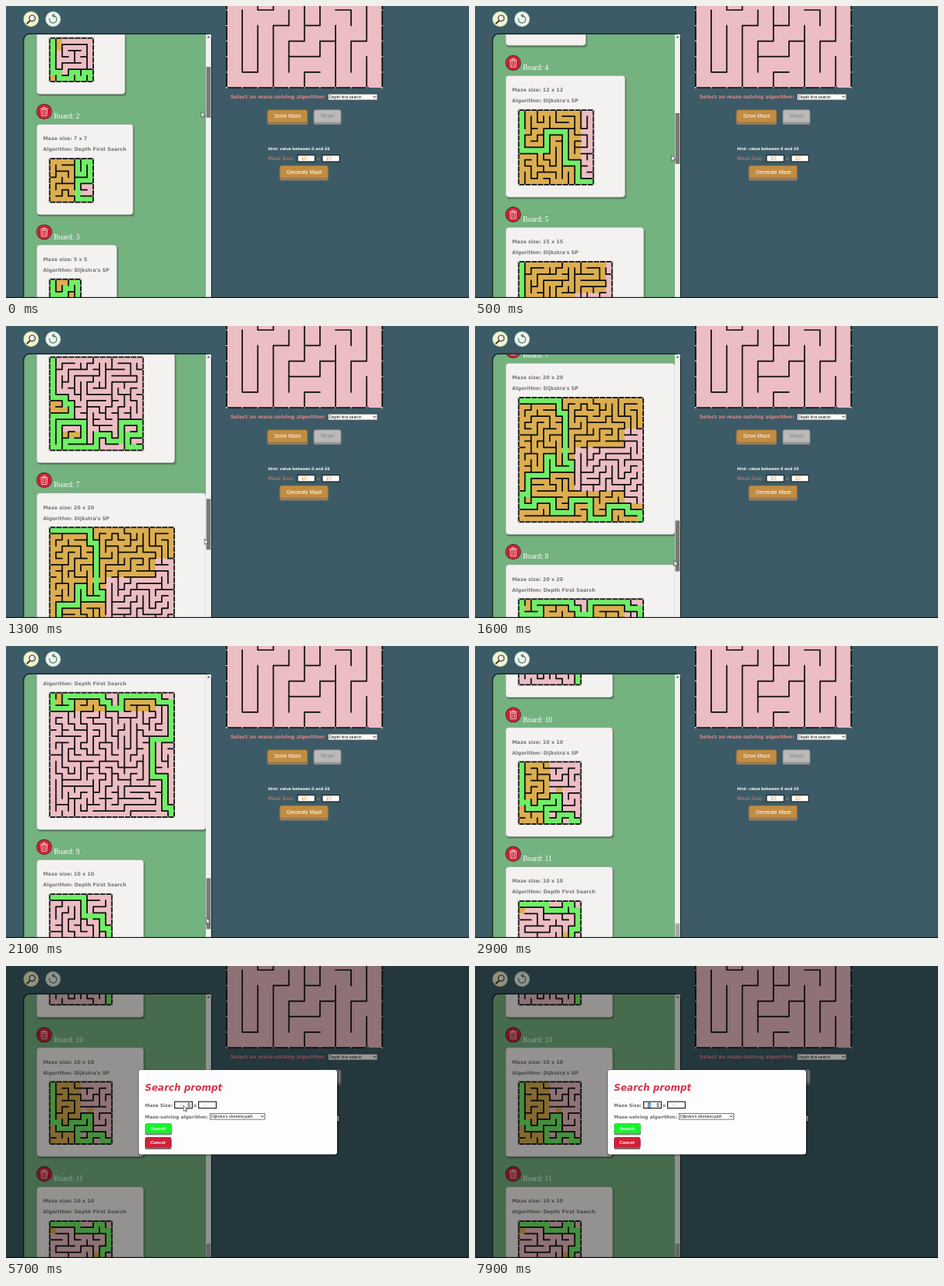
Animation, 600 px wide and 379 px high, one loop 8000 ms. Source, as an HTML page:

```html
<!DOCTYPE html>
<html lang="en">
<head>
<meta charset="utf-8">
<title>Maze boards</title>
<style>
  html, body { margin: 0; width: 100%; height: 100%; overflow: hidden; background: #3c5b66; }
  svg { display: block; }
  text { white-space: pre; }
  .sans { font-family: "DejaVu Sans", Verdana, sans-serif; font-size: 6.4px; }
  .ui { font-family: "Liberation Sans", Arial, sans-serif; font-size: 5.33px; }
  .serif { font-family: "Liberation Serif", Times, serif; font-size: 9.6px; }
  .bold { font-weight: bold; }
  .btn { font-size: 6.67px; }
  .small { font-size: 6px; }
  .hint { font-size: 4.8px; }
  .title { font-size: 12px; font-weight: bold; font-style: italic; }
</style>
</head>
<body>
<svg id="stage" width="600" height="379" viewBox="0 0 600 379"></svg>
<script>
const CELL = 8.07, BIG = 20.15, LOOP = 8000;
const GREEN = '#70ee66', ORANGE = '#dcae50', PINK = '#ecbdc3';
const STEP = { U: [0, -1], R: [1, 0], D: [0, 1], L: [-1, 0] };

// size, algorithm with its text width, seed, solution route,
// explored areas and holes in them (x0 y0 x1 y1 in base 36)
const DFS = ['Depth First Search', 125], SP = ["Dijkstra's SP", 104], BFS = ['Breadth First', 114.5];
const route15 = 'D6R2D1R1D2L3D5R1U4R4D3L3D1R5U2R2D1R2U3R3D2L2D2R2';
const boards = [
  [7, BFS, 3, 'D5R1D1R2U1R1D1R1U1R1D1', '1011 0606'],
  [7, DFS, 8, '4D2R1U2R1D3L2D3R2', '0036'],
  [5, SP, 5, 'D2R2U1R1U1R1D4', '0044'],
  [12, SP, 14, 'D6R4U3R3D5R2D3R2', '009b'],
  [15, SP, 21, route15, '10d4 1586 0728 2c4c'],
  [15, DFS, 21, route15, '0728 2c4c'],
  [20, SP, 33, 'R6D2R1D8R1D1L3U2L1D3L3D3L1D2R2U1R3D2R3U2R3D3R3U2R3D1R2D1', '00jj', '98ge h5jg'],
  [20, DFS, 47, 'D2R3U1L1U1R6D1R1D1R2U2R6D1R2D6L3D6R2D5R1D1', '0011 4182 c1g2'],
  [10, DFS, 52, 'R5D3R3D2R1D4', ''],
  [10, SP, 64, 'D6R1D1R2U1R2U1R1D2L2D2R2U1R2D1R1', '1045 0739 6464 2636'],
  [10, DFS, 71, 'R4D1R3U1R1D1R1D3L1D5R1', '0101 7575']
];

const random = seed => () => (seed = (seed * 16807) % 2147483647) / 2147483647;
const rect = (x, y, w, h, fill, extra = '') =>
  `<rect x="${x}" y="${y}" width="${w}" height="${h}" fill="${fill}" ${extra}/>`;
const path = (d, extra) => `<path d="${d}" ${extra}/>`;
const text = (x, y, s, cls, fill) =>
  `<text x="${x}" y="${y}" class="${cls}" fill="${fill}">${s}</text>`;
const at = (x, y, inner) => `<g transform="translate(${x} ${y})">${inner}</g>`;

function ticks(n, c, r) {
  let d = '';
  for (let i = 0; i <= n; i++) {
    const p = i * c, e = n * c;
    d += `M${p} ${-r}v${2 * r}M${p} ${e - r}v${2 * r}M${-r} ${p}h${2 * r}M${e - r} ${p}h${2 * r}`;
  }
  return path(d, 'stroke="#f6eeee" stroke-width="1"');
}

// Carves a maze around the route and returns the open links and the route's cells.
function carve(n, seed, route) {
  const rnd = random(seed * 7919), links = new Set(), seen = new Set(), stack = [];
  const key = (x, y) => y * n + x;
  const link = (a, b) => links.add(Math.min(a, b) + ':' + Math.max(a, b));
  const visit = (x, y) => { seen.add(key(x, y)); stack.push([x, y]); };
  let x = parseInt(route) || 0, y = 0;
  visit(x, y);
  for (const [, dir, count] of route.matchAll(/([URDL])(\d+)/g))
    for (let i = 0; i < +count; i++) {
      const from = key(x, y);
      x += STEP[dir][0];
      y += STEP[dir][1];
      link(from, key(x, y));
      visit(x, y);
    }
  const solved = new Set(seen);
  stack.sort(() => rnd() - 0.5);
  while (stack.length) {
    const [cx, cy] = stack[stack.length - 1];
    const next = Object.values(STEP).map(([dx, dy]) => [cx + dx, cy + dy])
      .filter(([a, b]) => a >= 0 && b >= 0 && a < n && b < n && !seen.has(key(a, b)));
    if (!next.length) { stack.pop(); continue; }
    const cell = next[Math.floor(rnd() * next.length)];
    link(key(cx, cy), key(...cell));
    visit(...cell);
  }
  return { links, solved };
}

const areaList = s => s.split(' ').filter(Boolean).map(a => [...a].map(c => parseInt(c, 36)));
const hit = (list, x, y) => list.some(([l, t, r, b]) => x >= l && x <= r && y >= t && y <= b);

function maze(n, seed, route, areas, holes = '') {
  const { links, solved } = carve(n, seed, route);
  const boxes = areaList(areas), gaps = areaList(holes), size = n * CELL;
  const fills = { [GREEN]: '', [ORANGE]: '' };
  let walls = '';
  for (let j = 0; j < n; j++)
    for (let i = 0; i < n; i++) {
      const k = j * n + i, x = i * CELL, y = j * CELL;
      const color = solved.has(k) ? GREEN : hit(boxes, i, j) && !hit(gaps, i, j) ? ORANGE : '';
      if (color) fills[color] += `M${x} ${y}h8.1v8.1h-8.1z`;
      if (i < n - 1 && !links.has(k + ':' + (k + 1))) walls += `M${x + CELL} ${y}v${CELL}`;
      if (j < n - 1 && !links.has(k + ':' + (k + n))) walls += `M${x} ${y + CELL}h${CELL}`;
    }
  return rect(0, 0, size, size, PINK) +
    Object.entries(fills).map(([c, d]) => path(d, `fill="${c}"`)).join('') +
    path(walls + `M0 0H${size}V${size}H0z`,
      'fill="none" stroke="#0b0b0b" stroke-width="1.75" stroke-linecap="round"') +
    ticks(n, CELL, 0.9);
}

const bin = `<circle r="10.1" fill="#4a2024"/><circle r="9.2" fill="#c9182e"/>
  <circle r="8.2" fill="none" stroke="#e0485a" stroke-width=".7"/>` +
  path('M-5 -3.8H5M-1.6 -4V-5.4H1.6V-4M-4 -2.1L-3.3 5.4H3.3L4 -2.1zM-1.4 -.8V4M1.4 -.8V4',
    'fill="none" stroke="#f6e4e4" stroke-width=".9"');

function list() {
  let top = -3;
  return boards.map(([n, [name, min], ...plan], i) => {
    const w = Math.max(min, n * CELL + 58), h = n * CELL + 61;
    const html = at(49.5, top - 16.5, bin) +
      text(62, top - 7.2, 'Board: ' + (i + 1), 'serif', '#fff') +
      rect(40.8, top + 1.6, w + 1, h + 1, '#000', 'rx="4" opacity=".18"') +
      rect(40.3, top + 1, w, h, '#000', 'rx="4" opacity=".35"') +
      rect(39.8, top, w, h, '#f4f2f0', 'rx="4" stroke="#8a958c" stroke-width=".6"') +
      text(48, top + 21, `Maze size: ${n} x ${n}`, 'sans bold', '#777') +
      text(48, top + 35, 'Algorithm: ' + name, 'sans bold', '#777') +
      at(56.6, top + 44.7, maze(n, ...plan));
    top += h + 39;
    return html;
  }).join('');
}

const button = (x, y, w, h, label, tx, ty, fill, edge, base, ink, cls = 'ui btn') =>
  rect(x, y + 3, w, h - 2.4, base, 'rx="2"') +
  rect(x + .5, y + .5, w - 1, h - 3, fill, `rx="2" stroke="${edge}"`) +
  text(tx, ty, label, cls, ink);
const gold = (x, y, w, label, tx) =>
  button(x, y, w, 19, label, tx, y + 10.8, '#c18d43', '#a8742c', '#8b7f70', '#fff');

const select = (x, y, w, h, label) =>
  rect(x + .4, y + .4, w - .8, h - .8, '#fff', 'stroke="#555" stroke-width=".8"') +
  text(x + 2, y + 6, label, 'ui', '#111') +
  path(`M${x + w - 5.5} ${y + 3.2}l1.7 1.9l1.7 -1.9`, 'fill="none" stroke="#111" stroke-width=".9"');

const field = (x, y, w, value, ink, tx) =>
  rect(x + .6, y + .6, w - 1.2, 8.4, '#fff', 'stroke="#15151a" stroke-width="1.1"') +
  text(tx, y + 7, value, 'ui btn', ink);

const bigWalls = 'M0 4V10H9.1M10 4V10M1 5V9H2V6M2 4V5H3M3 4V5M3 6V10M3 6H4V5M4 7V9' +
  'M5 4V7H4M4 8H6V7H7M5 9V10M6 9H5M6 4V6H5M7 6V10M7 5H8V6M8 7V9M9 4V7H8M9 8V10';
const bigMaze = at(286, 106 - 10 * BIG,
  rect(0, 0, 10 * BIG, 10 * BIG, PINK) +
  path(bigWalls, `transform="scale(${BIG})" fill="none" stroke="#0b0b0b" stroke-width=".085"
    stroke-linejoin="round" stroke-linecap="round"`) + ticks(10, BIG, 1));

const disc = (fill, rim, inner) =>
  `<circle r="9.3" fill="${fill}" stroke="${rim}" stroke-width="1.3"/>` + inner;
const lens = path('M-1.2 2L-5 5.6', 'stroke="#4d3a1d" stroke-width="2" stroke-linecap="round"') +
  '<circle cx="1.5" cy="-1.2" r="3.8" fill="#eef6ee" stroke="#3e4138" stroke-width="1.2"/>';
const redo = path('M-.5 -4.4A4.7 4.7 0 1 1 -4.5 -1.2M1.6 -6.8L-1 -4.4L1.6 -2.2',
  'fill="none" stroke="#5c8577" stroke-width="1.4"');

const modal = rect(0, 0, 600, 379, '#000', 'opacity=".4"') +
  rect(171, 134.5, 260, 112, '#000', 'rx="4" opacity=".3"') +
  rect(172, 135, 257, 109.5, '#fefdfd', 'rx="3"') +
  text(180, 162.3, 'Search prompt', 'sans title', '#d5354f') +
  text(180, 182.7, 'Maze Size:', 'sans bold small', '#6d6d6d') +
  field(218, 175.5, 24, '0', '#c4b7a2', 226) +
  '<g id="pick">' + rect(223.5, 177.5, 4.4, 6.4, '#5b9be0') + text(224, 182.5, '0', 'ui small', '#fff') + '</g>' +
  rect(234.5, 177.2, 5, 6.4, '#e4e4e4') +
  path('M235.3 179.8l1.7 -2l1.7 2zM235.3 181.2l1.7 2l1.7 -2z', 'fill="#444"') +
  text(243.2, 182.7, 'x', 'sans bold small', '#6d6d6d') +
  field(249, 175.5, 24, '0', '#dcc49a', 256) +
  text(180, 197.6, 'Maze-solving algorithm:', 'sans bold small', '#6d6d6d') +
  select(264, 191, 72, 8.5, "Dijkstra's shortest path") +
  button(180, 204, 35, 15, 'Search', 187, 213.2, '#12f52a', '#55c860', '#7f8f80', '#fff', 'ui bold small') +
  button(180, 222, 34.5, 15.5, 'Cancel', 187, 231.4, '#d21f38', '#b0283c', '#85686c', '#fff', 'ui bold small');

document.getElementById('stage').innerHTML =
  '<clipPath id="view">' + rect(24, 37, 235.3, 342, '#000') + '</clipPath>' +
  rect(0, 0, 600, 379, '#3c5b66') +
  rect(22.8, 36.2, 243.5, 400, '#74b280', 'rx="8" stroke="#10181a" stroke-width="1.2"') +
  '<g clip-path="url(#view)"><g id="list">' + list() + '</g></g>' +
  rect(259, 37, 6.8, 345, '#f1f1f1') +
  path('M260.6 41.2l1.8 -2.4l1.8 2.4z', 'fill="#505050"') +
  rect(259.6, 79, 5.6, 66, '#787878', 'id="thumb"') +
  '<circle id="glow" cx="32.5" cy="17" r="11.3" fill="#f2dc8a" opacity=".5"/>' +
  at(32.5, 17, disc('#f4f0cc', '#dcecc4', lens)) + at(61, 17, disc('#f1f6ee', '#d3e4d6', redo)) +
  bigMaze +
  text(291, 120.2, 'Select an maze-solving algorithm:', 'sans bold', '#e08187') +
  select(417, 113.8, 64.5, 8.6, 'Depth first search') +
  gold(338.5, 134.5, 52.5, 'Solve Maze', 347.4) +
  button(398.8, 134.5, 35.5, 19, 'Reset', 408, 145.3, '#b9b9b9', '#a2a2a2', '#8d8d8d', '#858585') +
  text(339.8, 186.6, 'Hint: value between 0 and 20', 'sans bold hint', '#fff') +
  text(339.5, 200, 'Maze Size:', 'sans', '#d77f80') +
  field(377.3, 193, 23.6, '10', '#e8920f', 382.6) + text(403, 200, 'x', 'sans', '#d77f80') +
  field(409.3, 193, 23.6, '10', '#e8920f', 414.6) +
  gold(354.6, 206.8, 63, 'Generate Maze', 363.8) +
  rect(0, 377.8, 600, 1.2, '#12191c') +
  '<g id="modal">' + modal + '</g>' +
  path('M0 0V7.4L1.8 5.8L3 8.4L4.2 7.9L3 5.4H5.2z',
    'id="arrow" fill="#fff" stroke="#222" stroke-width=".6"') +
  path('M224.4 178h2.4M225.6 178v7M224.4 185h2.4', 'id="beam" stroke="#333" stroke-width=".6" fill="none"');

const [listEl, thumb, glow, modalEl, pick, arrow, beam] =
  ['list', 'thumb', 'glow', 'modal', 'pick', 'arrow', 'beam'].map(id => document.getElementById(id));

const scrollKeys = [[0, 0], [900, 648], [1600, 1041], [2700, 1687]];
const pointerKeys = [[0, 253, 137], [900, 256, 239], [1600, 258, 304], [2700, 262, 412], [3300, 262, 412],
  [4300, 38, 16], [5000, 38, 16], [5600, 230, 181], [7300, 230, 181], [7700, 226, 179]];

function track(keys, t) {
  const i = keys.findIndex(k => k[0] > t);
  if (i < 0) return keys[keys.length - 1].slice(1);
  const a = keys[i - 1], b = keys[i], p = (t - a[0]) / (b[0] - a[0]);
  return a.slice(1).map((v, j) => v + (b[j + 1] - v) * p);
}
const show = (el, on) => el.setAttribute('visibility', on ? 'inherit' : 'hidden');

function draw(now) {
  const t = Math.floor((now % LOOP) / 100) * 100;
  const [scroll] = track(scrollKeys, t), [x, y] = track(pointerKeys, t);
  listEl.setAttribute('transform', `translate(0 ${-scroll})`);
  thumb.setAttribute('y', 79 + scroll / 6);
  thumb.setAttribute('fill', t < 2800 ? '#787878' : '#a8a8a8');
  arrow.setAttribute('transform', `translate(${x} ${y})`);
  modalEl.setAttribute('opacity', Math.min(1, Math.max(0, (t - 4800) / 300)));
  show(glow, t >= 4300 && t < 4900);
  show(pick, t >= 7800);
  show(beam, t >= 7800);
  show(arrow, t < 7800);
}

const start = performance.now();
function tick() {
  draw(performance.now() - start);
  requestAnimationFrame(tick);
}
tick();
</script>
</body>
</html>
```
